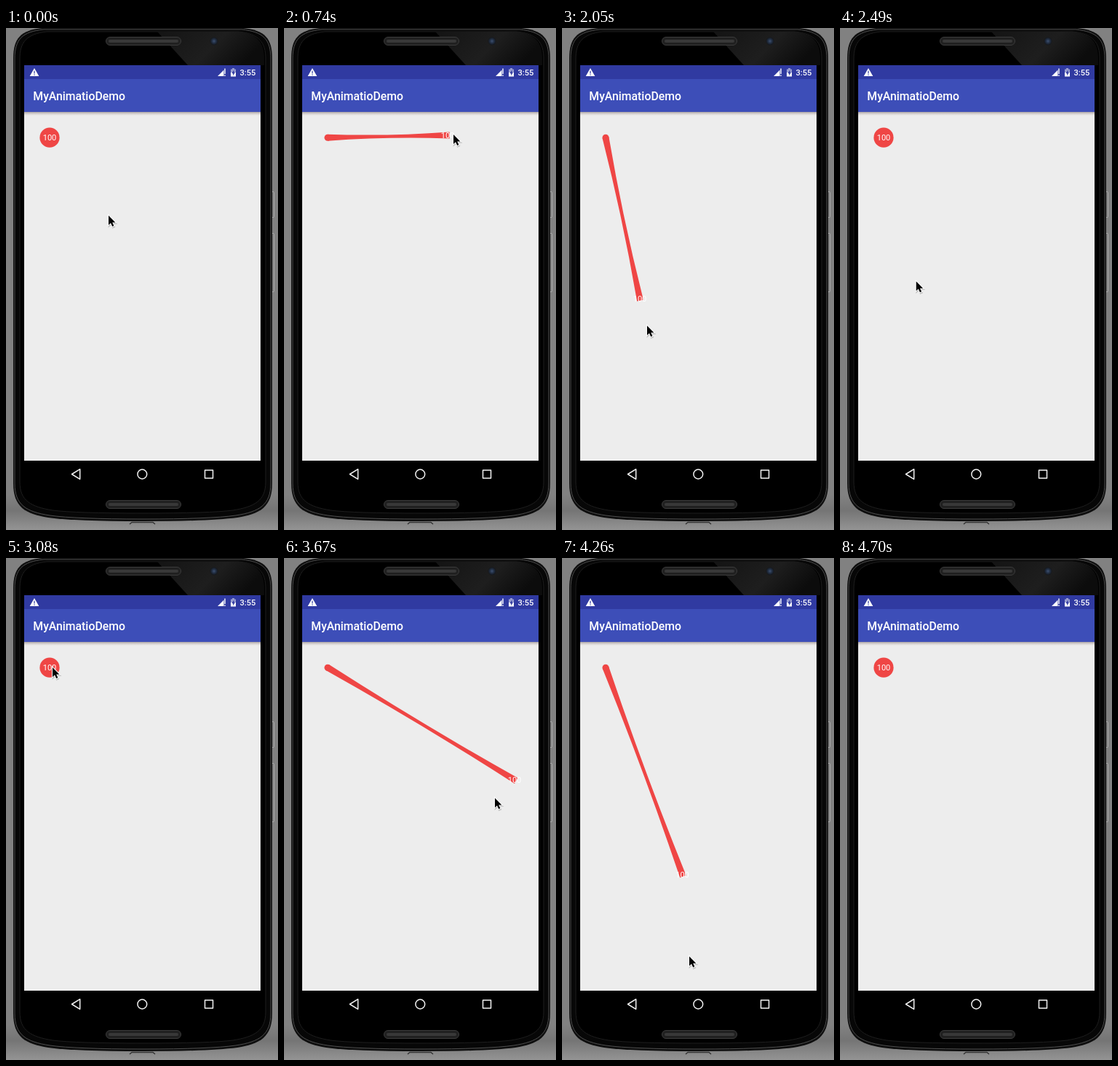
Recreate the animation shown at these times as an HTML page. Size 374x688 px, loop 5230 ms.

```html
<!DOCTYPE html>
<html lang="en">
<head>
<meta charset="utf-8">
<title>Sticky badge</title>
<style>
  html, body { margin: 0; width: 100%; height: 100%; overflow: hidden; background: #818181; }
  svg { display: block; width: 374px; height: 688px; }
  text { font-family: Roboto, sans-serif; fill: #fff; }
  .small { font-size: 11.06px; }
  .medium { font-weight: 500; }
  .nav { fill: none; stroke: #f2f2f2; stroke-width: 1.5; stroke-linejoin: round; }
</style>
</head>
<body>
<svg viewBox="0 0 374 688">
  <defs>
    <linearGradient id="floor" x2="0" y2="1">
      <stop offset="0" stop-color="#818181"/>
      <stop offset=".45" stop-color="#757575"/>
      <stop offset="1" stop-color="#949494"/>
    </linearGradient>
    <linearGradient id="sheen" x2="1" y2=".3">
      <stop offset="0" stop-color="#141414"/>
      <stop offset=".6" stop-color="#1e1e1e"/>
      <stop offset="1" stop-color="#0c0c0c"/>
    </linearGradient>
    <linearGradient id="drop" x2="0" y2="1">
      <stop offset="0" stop-color="#aaa4a6"/>
      <stop offset=".5" stop-color="#d6d1d0"/>
      <stop offset="1" stop-color="#ededed"/>
    </linearGradient>
    <radialGradient id="lens">
      <stop offset="0" stop-color="#3d5070"/>
      <stop offset=".5" stop-color="#222f44"/>
      <stop offset="1" stop-color="#141619"/>
    </radialGradient>
    <g id="speaker">
      <rect x="137.500" y=".5" width="103" height="11" rx="5.500" fill="#202020" stroke="#3b3b3b"/>
      <rect x="141" y="4" width="96" height="4" rx="2" fill="#383838"/>
    </g>
    <path id="arrow" d="M0 0V13L3 10.200L5.200 15L7.400 14L5.200 9.400H9.400Z"/>
  </defs>

  <rect width="374" height="688" fill="#818181"/>
  <rect y="640" width="374" height="48" fill="url(#floor)"/>
  <path d="M170 680L173 677.500H202L205 680" fill="none" stroke="#333" stroke-width="1.500"/>

  <!-- phone -->
  <g fill="#777" stroke="#bdbdbd" stroke-width=".8">
    <rect x="364" y="224.500" width="4.500" height="35" rx="1"/>
    <rect x="364" y="281.500" width="4.500" height="80" rx="1"/>
  </g>
  <path d="M10 42C10 14 20 3 50 0H326C356 3 366 14 366 42V624C366 656 350 666 318 671Q280 676 188 676Q96 676 58 671C26 666 10 656 10 624Z"
        fill="#0e0e0e"/>
  <path d="M12 42C12 16 22 5 52 2H324C354 5 364 16 364 42V624C364 654 348 663 316 668Q280 673 188 673Q96 673 60 668C28 663 12 654 12 624Z"
        fill="#070707" stroke="#4d4d4d"/>
  <path d="M19 42C19 20 28 8 56 5H320C348 8 357 20 357 42V622C357 648 342 656 312 661Q280 665 188 665Q96 665 64 661C34 656 19 648 19 622Z"
        fill="#000" stroke="#1e1e1e"/>
  <path d="M208 5H320C346 8 355 20 355 42V51H250Z" fill="url(#sheen)"/>
  <use href="#speaker" y="12"/>
  <use href="#speaker" y="647"/>
  <circle cx="286" cy="18" r="5.500" fill="url(#lens)"/>

  <!-- screen -->
  <rect x="25" y="51" width="325" height="542" fill="#ededed"/>
  <rect x="25" y="51" width="325" height="19" fill="#303aa1"/>
  <rect x="25" y="70" width="325" height="45" fill="#3d4eb8"/>
  <rect x="25" y="115" width="325" height="5" fill="url(#drop)"/>
  <text class="medium" x="37.300" y="99" font-size="15.800">MyAnimatioDemo</text>
  <text class="small medium" x="321.500" y="65">3:55</text>
  <g fill="#fff">
    <path d="M39 55L45.300 66H32.700Z"/>
    <path d="M291 66L299.500 57.500V66ZM300.300 55.500H301.700V63H300.300ZM300.300 64.500H301.700V66H300.300Z"/>
    <path d="M309 56.500H311V55H314V56.500H316V61H309Z" opacity=".5"/>
    <path d="M309 61H316V66.500H309Z"/>
  </g>
  <path d="M38.400 58.800H39.600V62.500H38.400ZM38.400 63.600H39.600V64.800H38.400ZM313.500 57.500L310.300 62.200H312.200V65.500L315 60.700H313.500Z"
        fill="#303aa1"/>
  <g class="nav">
    <path d="M90.500 611.500L101.700 604.700V618.300Z"/>
    <circle cx="187.300" cy="611.500" r="6.400"/>
    <rect x="273.500" y="606" width="11" height="11"/>
  </g>

  <!-- badge and pointer -->
  <g fill="#ef4645">
    <circle id="anchor" cx="60" cy="150.200"/>
    <path id="band"/>
  </g>
  <text id="label" class="small" text-anchor="middle">100</text>
  <g id="pointer">
    <use href="#arrow" opacity=".18" stroke="#000" stroke-width="2" transform="translate(.6 1.400)"/>
    <use href="#arrow" stroke="#fff" stroke-width="1.800" paint-order="stroke"/>
  </g>
</svg>
<script>
  const LOOP = 5230, TICK = 146.875, LEAD = 14, LAST = 32;
  const HOME = { x: 60, y: 150.2 };
  const FULL = 13.6, THIN = 4.5;

  // tick, x, y of the pointer tip
  const route = [
    [0, 141, 257], [2, 62, 150], [3, 130, 149], [4, 223, 147], [5, 233, 146],
    [6, 190, 134], [8, 62, 150], [9, 62, 152], [11, 20, 280], [12, 50, 330],
    [13, 105, 371], [14, 117, 408], [16, 117, 408], [20, 68, 165], [21, 64, 150],
    [22, 66, 152], [24, 315, 304], [25, 290, 329], [26, 103, 435], [27, 152, 322],
    [29, 175, 546], [31, 192, 472]
  ];
  const drags = [[3, 8], [10, 17], [23, 31]];

  const [anchor, band, label, pointer] =
    ['anchor', 'band', 'label', 'pointer'].map(id => document.getElementById(id));

  function tipAt(tick) {
    const i = route.findIndex(p => p[0] >= tick);
    if (i < 1) return { x: route[0][1], y: route[0][2] };
    const [t0, x0, y0] = route[i - 1], [t1, x1, y1] = route[i];
    const u = (tick - t0) / (t1 - t0);
    return { x: x0 + (x1 - x0) * u, y: y0 + (y1 - y0) * u };
  }

  function bandPath(end, r) {
    const dx = end.x - HOME.x, dy = end.y - HOME.y, d = Math.hypot(dx, dy) || 1;
    const ux = dx / d, uy = dy / d, nx = -uy * r, ny = ux * r;
    const ex = end.x + ux * 2.7, ey = end.y + uy * 2.7;
    const mid = `${(HOME.x + ex) / 2} ${(HOME.y + ey) / 2}`;
    return `M${HOME.x + nx} ${HOME.y + ny}Q${mid} ${ex + nx} ${ey + ny}` +
      `L${ex - nx} ${ey - ny}Q${mid} ${HOME.x - nx} ${HOME.y - ny}Z`;
  }

  function draw(tick) {
    const dragging = drags.some(([from, to]) => tick >= from && tick < to);
    let end = HOME, r = FULL;
    if (dragging) {
      // the touch trails the pointer by one tick
      const tip = tipAt(tick - 1);
      end = { x: tip.x + 2, y: tip.y };
      r = Math.max(THIN, FULL - Math.hypot(end.x - HOME.x, end.y - HOME.y) / 10);
    }
    anchor.setAttribute('r', r);
    band.setAttribute('d', dragging ? bandPath(end, r) : '');
    label.setAttribute('x', end.x);
    label.setAttribute('y', end.y + 4.1);

    const shown = tick < LAST;
    pointer.setAttribute('visibility', shown ? 'visible' : 'hidden');
    if (shown) {
      const tip = tipAt(tick);
      pointer.setAttribute('transform', `translate(${tip.x} ${tip.y})`);
    }
  }

  const start = performance.now();
  function frame() {
    const t = (performance.now() - start) % LOOP;
    draw(Math.min(LAST, Math.floor((t + LEAD) / TICK)));
    requestAnimationFrame(frame);
  }
  frame();
</script>
</body>
</html>
```
